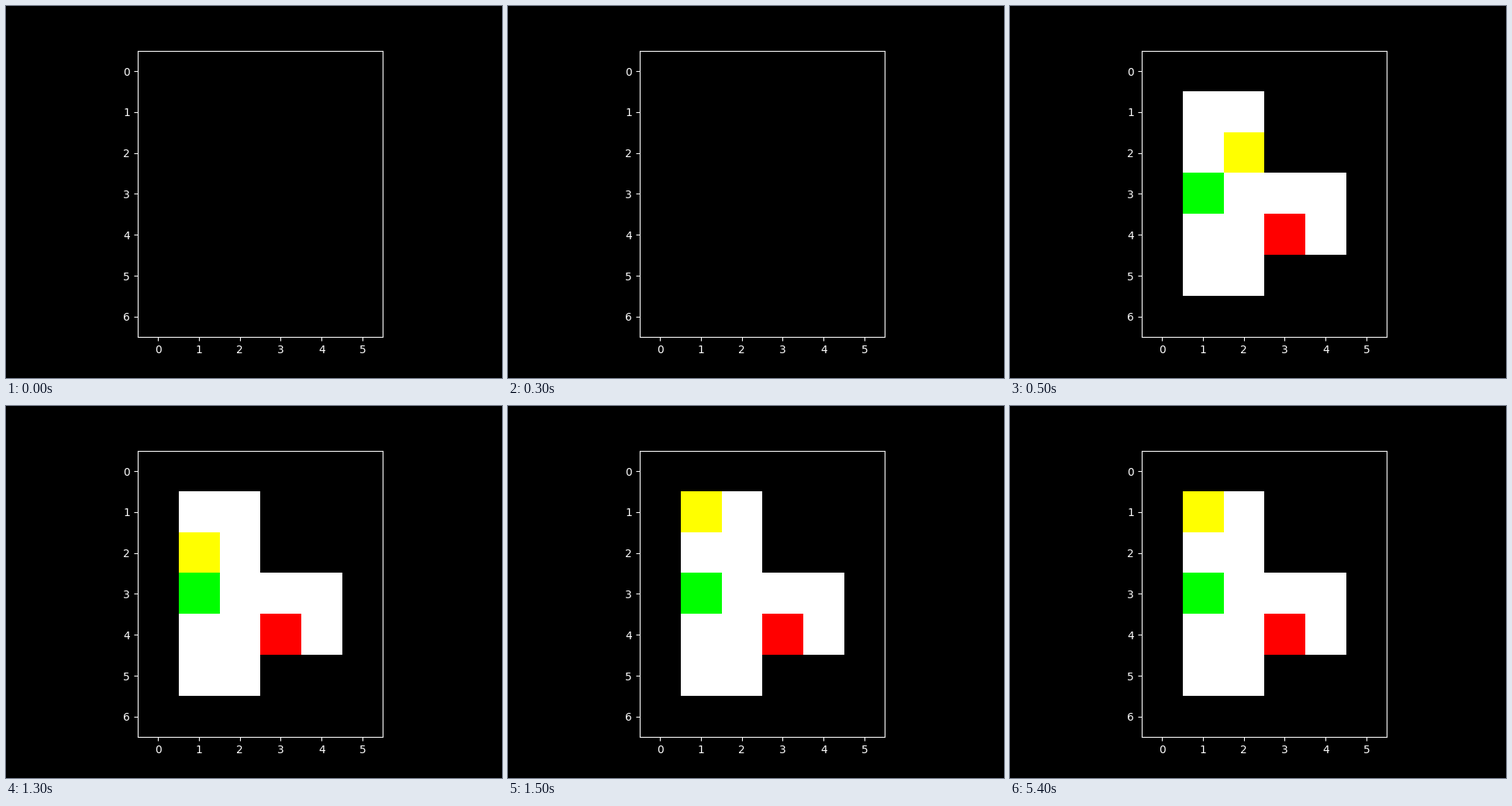
A matplotlib script for the animation above (8 s loop, 640x480 px).

```python
import numpy as np
import matplotlib.pyplot as plt
from matplotlib.animation import FuncAnimation

WALL, FLOOR = (0, 0, 0), (255, 255, 255)
BOX, GOAL, AGENT = (255, 0, 0), (0, 255, 0), (255, 255, 0)

MAZE = [
    "######",
    "#  ###",
    "#  ###",
    "#G   #",
    "#  B #",
    "#  ###",
    "######",
]
COLORS = {"#": WALL, " ": FLOOR, "G": GOAL, "B": BOX}
PATH = [(2, 2), (2, 1), (1, 1)]  # agent cells as (row, column)
STEP_MS, LOOP_MS = 500, 8000

BOARD = np.array([[COLORS[c] for c in row] for row in MAZE], dtype=np.uint8)


def board_at(step):
    """Blank board first, then the agent walks its path and stays at the end."""
    if step == 0:
        return np.zeros_like(BOARD)
    board = BOARD.copy()
    board[PATH[min(step, len(PATH)) - 1]] = AGENT
    return board


plt.style.use("dark_background")
plt.rcParams["font.family"] = "DejaVu Sans"
fig, ax = plt.subplots(figsize=(6.4, 4.8), dpi=100)
image = ax.imshow(board_at(0), interpolation="nearest")
ax.set_xticks(range(BOARD.shape[1]))
ax.set_yticks(range(BOARD.shape[0]))


def update(step):
    image.set_data(board_at(step))
    return [image]


anim = FuncAnimation(fig, update, frames=LOOP_MS // STEP_MS, interval=STEP_MS,
                     repeat=True, repeat_delay=0, blit=False)
plt.show()
```
